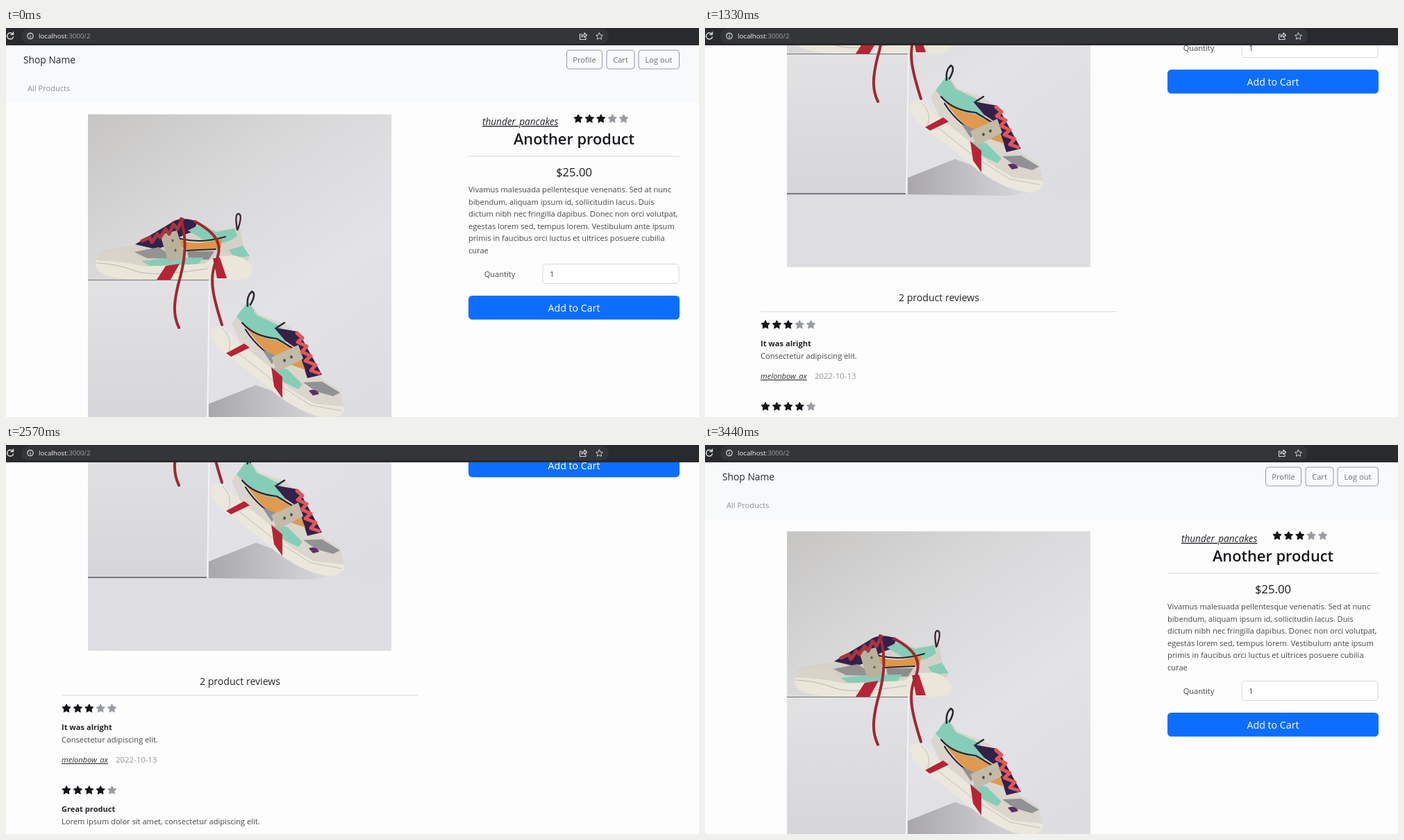
An HTML page that plays this animation: 998x561 px, repeating every 3480 ms.

```html
<!DOCTYPE html>
<html lang="en">
<head>
<meta charset="utf-8">
<title>Shop product page</title>
<style>
  html, body { margin: 0; width: 100%; height: 100%; overflow: hidden; background: #fdfdfd; }
  svg { display: block; width: 100vw; height: 100vh; }
  text { font: 11.1px "Open Sans", "Noto Sans", sans-serif; fill: #43474b; }
  .mid { text-anchor: middle; }
  .nav { fill: #8d9298; }
  .brand { font-size: 13.8px; fill: #25282b; }
  .outline text { fill: #6c737b; }
  .outline rect { fill: none; stroke: #9499a6; }
  .author { font-style: italic; text-decoration: underline; fill: #303236; }
  .seller { font-size: 13.6px; fill: #202226; }
  .title { font-size: 21.8px; font-weight: 600; fill: #17191c; }
  .price { font-size: 16.6px; font-weight: 500; fill: #17191c; }
  .heading { font-size: 14.1px; font-weight: 500; fill: #212529; }
  .buy { font-size: 14.2px; fill: #fff; }
  .bold { font-weight: 700; fill: #212529; }
  .date { font-size: 11.4px; fill: #92969b; }
  .rule { stroke: #d5d6d8; }
  .url { font-size: 9.7px; fill: #f1f1f1; }
  .line { fill: none; stroke-linecap: round; stroke-linejoin: round; }
</style>
</head>
<body>
<svg viewBox="0 0 998 561">
  <defs>
    <linearGradient id="wall" x2=".55" y2="1">
      <stop offset="0" stop-color="#c6c5c3"/>
      <stop offset=".3" stop-color="#d8d7d8"/>
      <stop offset=".65" stop-color="#e3e2e7"/>
      <stop offset="1" stop-color="#dcdce1"/>
    </linearGradient>
    <linearGradient id="box" x2="0" y2="1">
      <stop offset="0" stop-color="#e2e1e3"/>
      <stop offset="1" stop-color="#d6d5d9"/>
    </linearGradient>
    <linearGradient id="shade" x2="1" y2="0">
      <stop offset="0" stop-color="#a9a7ac"/>
      <stop offset="1" stop-color="#a9a7ac" stop-opacity="0"/>
    </linearGradient>
    <path id="star" d="M0-6.3 2-2.5 6.2-1.9 3.1 1 3.8 5.3 0 3.3-3.8 5.3-3.1 1-6.2-1.9-2-2.5Z" stroke-linejoin="round"/>
  </defs>

  <g id="page">
    <rect y="25" width="998" height="82" fill="#f7f9fa"/>
    <text x="25" y="51" class="brand">Shop Name</text>
    <text x="31" y="91" class="nav">All Products</text>
    <g class="outline mid">
      <rect x="807.5" y="32" width="51" height="27" rx="4"/><text x="833" y="50">Profile</text>
      <rect x="865" y="32" width="40" height="27" rx="4"/><text x="885" y="50">Cart</text>
      <rect x="911" y="32" width="58.5" height="27" rx="4"/><text x="940" y="50">Log out</text>
    </g>

    <g id="photo">
      <rect x="118" y="124.5" width="437" height="546" fill="url(#wall)"/>
      <path d="M118 565H290L300 542 555 570V670.5H118Z" fill="#dedee2"/>
      <path d="M292 542 360 515 484 560 440 568 292 566Z" fill="url(#shade)"/>
      <path d="M118 364H293L290 565H118Z" fill="url(#box)"/>
      <path d="M293 364 290 565" stroke="#f4f3f5" stroke-width="2"/>
      <path d="M118 565H289" stroke="#55565d" stroke-width="1.7"/>
      <path d="M118 363.5H292" stroke="#77716d"/>

      <g id="level-shoe">
        <path d="M133 326Q140 318 185 313L235 283Q250 269 275 278L302 292 328 289Q334 280 337 287L341 312 350 330 345 350H140Z" fill="#d5d1c8"/>
        <path d="M186 312 236 282Q250 270 276 279L270 294Q250 298 238 312L216 319Z" fill="#35204a"/>
        <path d="M276 285 303 294 329 289 333 300Q310 318 284 305L262 292Z" fill="#86cdb7"/>
        <path d="M245 303Q272 317 312 303L309 317 265 321 248 314Z" fill="#de9746"/>
        <path d="M248 303Q278 312 316 301M258 321 302 319" class="line" stroke="#292434" stroke-width="2"/>
        <path d="M185 323 220 316 245 333 203 332Z" fill="#949392"/>
        <path d="M261 322H300L292 334H263Z" fill="#8d8c8b"/>
        <path d="M195 336 232 332 284 331 276 342 207 343ZM321 320 341 314 351 329 329 331Z" fill="#86cdb7"/>
        <path d="M171 331Q181 326 187 334L177 335Z" fill="#342146"/>
        <path d="M130 335Q126 350 144 357 164 363 190 363H340Q357 362 354 344 348 333 329 328L302 329 286 340Q236 342 205 344L160 336Z" fill="#eae6da"/>
        <path d="M132 328Q154 314 183 324L203 344Q165 336 131 335Z" fill="#d9d4ca"/>
        <path d="M131 339Q160 340 185 350T290 347" class="line" stroke="#bdb7ab"/>
        <path d="M217 363 230 343 250 340 237 363ZM298 332 308 331 318 361 304 361Z" fill="#b72435"/>
        <path d="M222 298 246 292 258 331 234 338Z" fill="#b8b29d"/>
        <path d="M240 306V307M244 320V321" class="line" stroke="#615e50" stroke-width="3"/>
        <path d="M196 307 207 302 210 309 218 297 222 302 230 290 235 297 241 283 247 290 254 276" class="line" stroke="#a73640" stroke-width="5"/>
        <path d="M333 291Q329 267 335 268T334 290" class="line" stroke="#3d2633" stroke-width="2.3"/>
        <path d="M252 275C262 309 257 339 248 370 242 395 240 414 249 432M272 279C302 295 313 311 303 335 291 361 299 390 311 428" class="line" stroke="#9d2932" stroke-width="4"/>
      </g>

      <g id="tilted-shoe">
        <path d="M325 426 349 393 364 413 402 427 426 445 454 505 481 522 487 550 430 543 345 470Z" fill="#dad6ce"/>
        <path d="M332 416 349 394 361 414 395 430 407 452 389 456 357 444Z" fill="#86cdb7"/>
        <path d="M386 432 421 438 455 500 434 505 421 464 402 451Z" fill="#35204a"/>
        <path d="M343 426Q362 448 390 451L419 465 431 493 402 483Q365 466 343 426Z" fill="#df9a50"/>
        <path d="M340 425Q357 445 390 448L415 463M345 435Q366 468 402 483" class="line" stroke="#292434" stroke-width="2.2"/>
        <path d="M369 464 390 473 383 485ZM428 511 455 510 481 526 471 531 446 524Z" fill="#929195"/>
        <path d="M385 490 405 492 427 514 421 521 398 510Z" fill="#86cdb7"/>
        <path d="M436 523Q447 519 451 528L442 530Z" fill="#612b68"/>
        <path d="M294 440Q294 428 313 431L338 455 380 489 408 520 444 542 486 546Q491 558 470 563 438 563 394 532L335 484Q300 464 294 440Z" fill="#ebe7dd"/>
        <path d="M311 433Q327 446 321 466M328 464 389 512 439 544 483 552" class="line" stroke="#c4beb2"/>
        <path d="M317 469 343 455 351 461 324 474ZM382 489 398 503 398 534 386 517Z" fill="#b72435"/>
        <path d="M382 475 421 457 428 477 391 496Z" fill="#c1bba8"/>
        <path d="M401 479V480M411 474V475" class="line" stroke="#4e4940" stroke-width="3.5"/>
        <path d="M419 440 427 447 420 453 433 459 426 467 439 473 431 480 446 486 439 494 451 498" class="line" stroke="#df5758" stroke-width="5"/>
        <path d="M348 401Q346 387 354 380 361 383 352 399M390 432 401 425" class="line" stroke="#2b2530" stroke-width="2.5"/>
      </g>
    </g>

    <text x="686" y="140" class="author seller">thunder_pancakes</text>
    <g class="stars" data-x="824" data-y="131" data-score="3"></g>
    <text x="818" y="168" class="title mid">Another product</text>
    <path d="M666 185H970" class="rule"/>
    <text x="818" y="214" class="price mid">$25.00</text>
    <g id="description"></g>
    <text x="711" y="359" class="mid">Quantity</text>
    <rect x="773" y="340.5" width="196" height="28" rx="4.5" fill="#fff" stroke="#d3d7dd"/>
    <text x="783" y="359">1</text>
    <rect x="666" y="386" width="304" height="34.5" rx="5.5" fill="#0d6efd"/>
    <text x="818" y="409" class="buy mid">Add to Cart</text>

    <text x="337" y="720" class="heading mid">2 product reviews</text>
    <path d="M80 735H593" class="rule"/>
    <g>
      <g class="stars" data-x="87" data-y="754" data-score="3"></g>
      <text x="80" y="785" class="bold">It was alright</text>
      <text x="80" y="803">Consectetur adipiscing elit.</text>
      <text x="80" y="832" class="author">melonbow_ax</text>
      <text x="158" y="832" class="date">2022-10-13</text>
    </g>
    <g transform="translate(0 118)">
      <g class="stars" data-x="87" data-y="754" data-score="4"></g>
      <text x="80" y="785" class="bold">Great product</text>
      <text x="80" y="803">Lorem ipsum dolor sit amet, consectetur adipiscing elit.</text>
      <text x="80" y="832" class="author">pear</text>
      <text x="113" y="832" class="date">2022-10-13</text>
    </g>
  </g>

  <g id="toolbar">
    <rect width="998" height="25" fill="#292a2d"/>
    <rect x="22" y="1" width="846" height="21" rx="10.5" fill="#343539"/>
    <g class="line" stroke="#d7d8da" stroke-width="1.2">
      <path d="M9.5 8.5A4.5 4.5 0 1 0 10.5 13M10.5 6V9.5H7" stroke-width="1.5"/>
      <circle cx="35" cy="11.5" r="4.2"/>
      <path d="M35 11V13.5M35 9V9.1"/>
      <path d="M829 9H826.5V16.5H835V14M829 13Q829 9.5 833 9.5V7L836.5 10.5 833 13.5V11.5Q830 11.5 829 13"/>
      <use href="#star" transform="translate(854.5 12) scale(.8)"/>
    </g>
    <text x="47" y="15" class="url">localhost<tspan fill="#a3a4a6">:3000/2</tspan></text>
  </g>
</svg>
<script>
  const LOOP = 3480, BOTTOM = 426;
  const page = document.getElementById("page");

  document.getElementById("description").innerHTML = [
    "Vivamus malesuada pellentesque venenatis. Sed at nunc",
    "bibendum, aliquam ipsum id, sollicitudin lacus. Duis",
    "dictum nibh nec fringilla dapibus. Donec non orci volutpat,",
    "egestas lorem sed, tempus lorem. Vestibulum ante ipsum",
    "primis in faucibus orci luctus et ultrices posuere cubilia",
    "curae"
  ].map((line, i) => `<text x="666" y="${237 + i * 17.5}">${line}</text>`).join("");

  for (const group of document.querySelectorAll(".stars")) {
    const { x, y, score } = group.dataset;
    group.innerHTML = [0, 1, 2, 3, 4].map(i => {
      const color = i < score ? "#141518" : "#999ba2";
      return `<use href="#star" x="${+x + i * 16.4}" y="${y}" fill="${color}" stroke="${color}"/>`;
    }).join("");
  }

  function smooth(time, start, end) {
    const u = Math.min(1, Math.max(0, (time - start) / (end - start)));
    return u * u * (3 - 2 * u);
  }

  function draw(now) {
    const time = now % LOOP;
    const scroll = BOTTOM * (smooth(time, 1060, 1455) - smooth(time, 2510, 2789));
    page.setAttribute("transform", `translate(0 ${-Math.round(scroll)})`);
    requestAnimationFrame(draw);
  }
  draw(performance.now());
</script>
</body>
</html>
```
